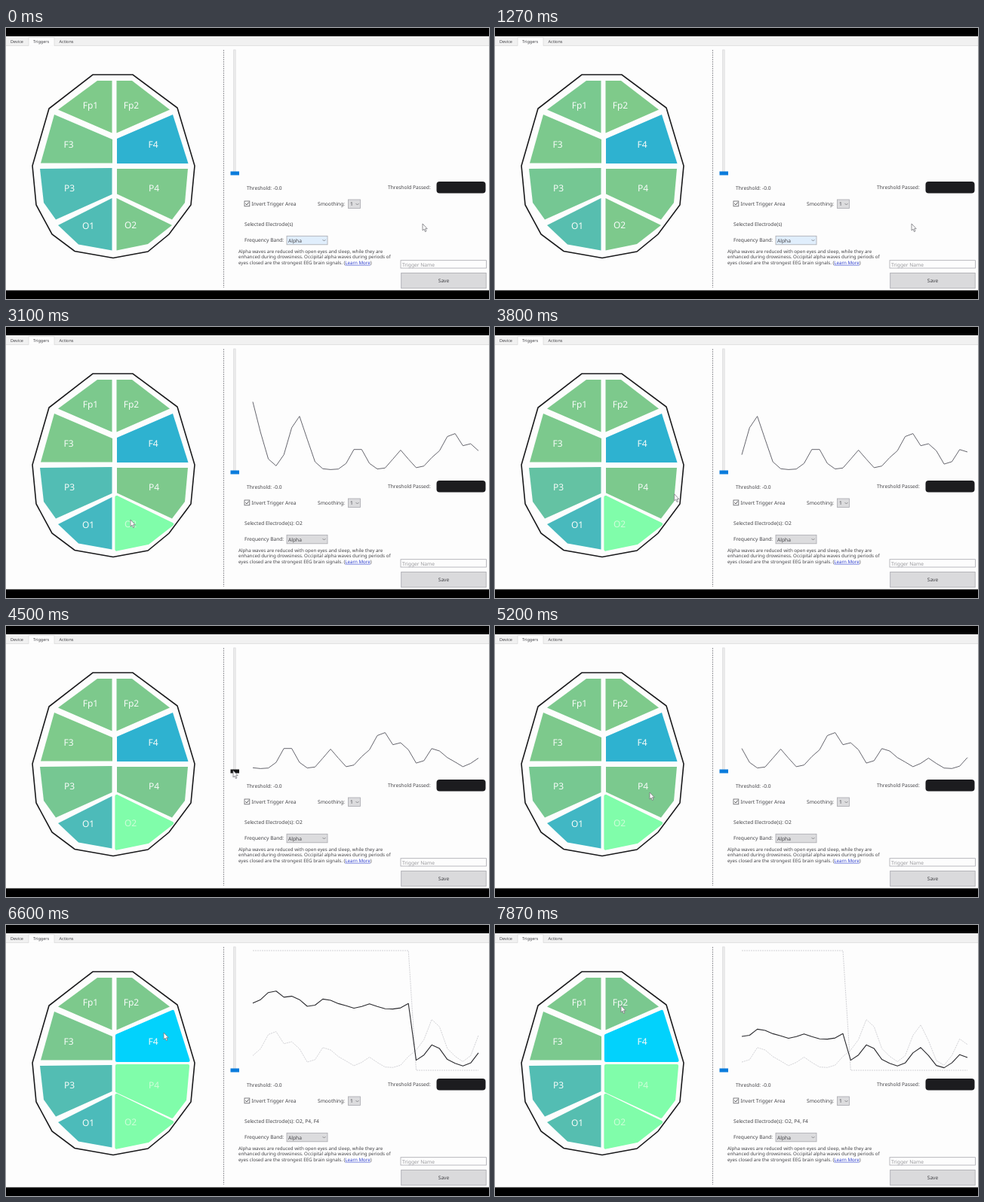
Write an HTML page that moves like this. It is 640 px wide and 360 px high and loops after 8000 ms.

```html
<!DOCTYPE html>
<html lang="en">
<head>
<meta charset="utf-8">
<title>Triggers</title>
<style>
html, body { margin: 0; width: 100%; height: 100%; overflow: hidden; background: #fdfdfd; }
svg { display: block; width: 640px; height: 360px; }
text { font-family: "Noto Sans", "Open Sans", sans-serif; font-size: 6.65px; fill: #444448; text-rendering: geometricPrecision; }
.tab { font-size: 5.5px; }
.note { font-size: 6.2px; }
.name { font-size: 12px; fill: #f6fbf8; text-anchor: middle; }
.box { stroke: #a8a8ae; stroke-width: .8; }
.side { stroke: #d2d2d6; stroke-width: 1; stroke-dasharray: 2 1; }
</style>
</head>
<body>
<svg viewBox="0 0 640 360">
  <rect width="640" height="360" fill="#fdfdfd"/>
  <rect y="11" width="640" height="12.5" fill="#f1f1f1"/>
  <path d="M0 23.5H30V12.5H64V23.5H640" fill="#fdfdfd" stroke="#dcdcdc" stroke-width=".8"/>
  <path d="M0 0H640V11H0ZM0 348.5H640V360H0Z" fill="#000"/>
  <text class="tab" x="6" y="20">Device</text>
  <text class="tab" x="36" y="19.6">Triggers</text>
  <text class="tab" x="70.5" y="20">Actions</text>

  <path d="M288.5 29V345" stroke="#9a9a9e" stroke-dasharray="2 1"/>
  <rect x="301.7" y="29" width="2.4" height="163" fill="#eeeeee" stroke="#d6d6d8" stroke-width=".7"/>
  <rect id="knob" x="297.5" y="190.5" width="11.5" height="5"/>

  <path d="M115 62H168L227 106L250 183L245 235L216 274L188 297L142 305.5L91 296.5L61 274L40 235L35 183L57 107Z" fill="#fdfdfd" stroke="#1a1a1c" stroke-width="1.6"/>
  <g id="head"></g>

  <g fill="none" stroke-linejoin="round">
    <polyline id="lineO2" class="side"/>
    <polyline id="lineP4" class="side"/>
    <polyline id="mean"/>
  </g>

  <text x="319" y="214.5">Threshold:</text>
  <text x="354" y="214.5">-0.0</text>
  <text x="506" y="214">Threshold Passed:</text>
  <rect x="570.5" y="204" width="65" height="15.5" rx="4" fill="#1c1c1f"/>
  <rect class="box" x="316" y="230" width="6.8" height="6.8" fill="#fdfdfd" style="stroke:#606064"/>
  <path d="M317.4 233.3L319 235L321.6 231.6" fill="none" stroke="#444448" stroke-width=".9"/>
  <text x="325.5" y="236.2">Invert Trigger Area</text>
  <text x="413" y="235.8">Smoothing:</text>
  <rect class="box" x="453.5" y="228" width="16" height="11.5" fill="#dcdcde"/>
  <text x="456" y="236.3">1</text>
  <path d="M463.5 233L465.5 235L467.5 233" fill="none" stroke="#6c6c70" stroke-width=".7"/>
  <text id="picked" x="316" y="263.3"></text>
  <text x="316" y="284.3">Frequency Band:</text>
  <rect id="band" class="box" x="372" y="276.3" width="54" height="11.5"/>
  <text x="374" y="284.6">Alpha</text>
  <path d="M419.5 281L421.5 283L423.5 281" fill="none" stroke="#6c6c70" stroke-width=".7"/>
  <text class="note" x="308" y="299">Alpha waves are reduced with open eyes and sleep, while they are</text>
  <text class="note" x="308" y="306.4">enhanced during drowsiness. Occipital alpha waves during periods of</text>
  <text class="note" x="308" y="313.8">eyes closed are the strongest EEG brain signals. (<tspan text-decoration="underline" fill="#3344d0">Learn More</tspan>)</text>
  <rect class="box" x="523" y="308.7" width="113.5" height="10.3" fill="#fdfdfd"/>
  <text x="525" y="316.5" style="fill:#98989c">Trigger Name</text>
  <rect class="box" x="523.7" y="325.5" width="112.5" height="20.3" fill="#dadadc"/>
  <text x="580" y="338.3" text-anchor="middle">Save</text>

  <path id="cursor" d="M0 0V9L2 7.2L3.4 10.6L4.9 10L3.5 6.7H6.2Z" fill="#fdfdfd" stroke="#77777c" stroke-width=".8"/>
</svg>
<script>
const LOOP = 8000, PICK = { O2: 2130, P4: 5270, F4: 6570 }, F4_JOINS = 6730;
const GREEN = [127, 202, 138], TEAL = [60, 182, 200];
const $ = id => document.getElementById(id);
const set = (el, attrs) => { for (const k in attrs) el.setAttribute(k, attrs[k]); };
const make = (tag, attrs) => {
  const el = document.createElementNS('http://www.w3.org/2000/svg', tag);
  set(el, attrs);
  return $('head').appendChild(el);
};
const mix = (a, b, u) => a + (b - a) * u;
const smooth = u => u * u * (3 - 2 * u);
const noise = n => { const s = Math.sin(n * 12.9898) * 43758.5453; return s - Math.floor(s); };

// value at t between keys of [time, ...values]
function track(keys, t, ease = u => u) {
  let i = 0;
  while (i < keys.length - 2 && t >= keys[i + 1][0]) i++;
  const [a, b] = [keys[i], keys[i + 1]];
  const u = ease(Math.min(1, Math.max(0, (t - a[0]) / (b[0] - a[0]))));
  return a.slice(1).map((v, k) => mix(v, b[k + 1], u));
}

// name, label position, outline
const parts = [
  ['Fp1', 112, 107, '121,70 140.5,70 140.5,139.5 69,108.5'],
  ['Fp2', 166, 107, '146.5,70 167,70 217,108.5 146.5,139.5'],
  ['F3', 83, 159, '64,115 141,148 141,179.5 46,179.5'],
  ['F4', 195, 159, '221,115 241.5,180 147,180 147,147'],
  ['P3', 84, 217, '45,187 140.5,186 140.5,221 66,254.5 50,232'],
  ['P4', 196, 217, '147,187 241,187 237,232 220,254.5 147,220.5'],
  ['O1', 109, 267, '140.5,226 140.5,295.5 96,287.5 69,262'],
  ['O2', 165, 266, '146.5,226 220,262 188,287 146.5,295.5']
].map(([name, x, y, points]) => {
  const shape = make('polygon', { points, 'stroke-width': 4.2, 'stroke-linejoin': 'round' });
  const label = make('text', { x, y, class: 'name' });
  label.textContent = name;
  return { name, shape, label };
});

const path = [[1400, 552, 260], [1720, 470, 305], [2110, 165, 256], [3200, 165, 256],
  [4350, 301, 192], [4630, 301, 192], [4940, 205, 221], [5800, 205, 221],
  [6450, 209, 143], [7470, 209, 143], [7870, 167, 107]];

// share of teal in the two lively electrodes
const teal = {
  P3: [[0, .7], [1270, .15], [3100, .7], [4500, .12], [5200, .12], [6600, .66]],
  O1: [[0, .7], [1270, .6], [3100, .9], [4500, .75], [5200, .95], [7870, .6]]
};
function tint(name, i, t) {
  if (name === 'F4') return '#2eb2d0';
  const u = teal[name] ? track(teal[name], t)[0] : .08 * noise(i + Math.floor(t / 800));
  return `rgb(${GREEN.map((v, k) => Math.round(mix(v, TEAL[k], u)))})`;
}

// O2 signal: peaks of [sample, height] over a flat floor; higher ones are wider
const peaks = [[-.4, 95], [5.8, 72], [13.5, 31], [19, 26], [23.3, 15], [25.6, 50], [28.3, 33],
  [32.3, 28], [34.4, 11], [38, 14], [43.6, 18], [46.3, 66], [49, 12], [51.8, 14], [53.1, 52], [58.3, 40]];
const o2 = i => peaks.reduce((y, [c, h]) => y - h * Math.exp(-(((i - c) / (1.1 + h / 150)) ** 2)), 189.5);
const DROP = 44;
const p4 = i => i < DROP ? 34 : 193;

// first visible sample
const pace = [[2100, -7], [3100, 0], [4500, 9], [5200, 14], [6600, 23], [7870, 30]];
const plot = (start, f) => Array.from({ length: 30 }, (_, i) =>
  `${(327 + i * 10.31).toFixed(1)},${f(start + i).toFixed(1)}`).join(' ');

function draw(t) {
  const on = name => t >= PICK[name];
  const tick = Math.floor((t + 67) / 133.34) * 133.34 - 67;
  parts.forEach(({ name, shape, label }, i) => {
    const light = on(name);
    const fill = !light ? tint(name, i, tick) : name === 'F4' ? '#02d2fc' : '#80fdaa';
    set(shape, { fill, stroke: light ? fill : 'none' });
    label.style.fill = light && name !== 'F4' ? '#cdfdd8' : '';
  });

  const start = Math.floor(track(pace, t)[0] + 1e-6), both = on('P4');
  const lift = t >= F4_JOINS ? 40 : 0;
  const mean = i => both ? (o2(i) + p4(i)) / 2 + (i < DROP ? lift : 0) : o2(i);
  set($('mean'), {
    points: on('O2') ? plot(start, mean) : '',
    stroke: both ? '#2a2a2e' : '#55555e',
    'stroke-width': both ? 1.1 : .9
  });
  set($('lineO2'), { points: both ? plot(start, o2) : '' });
  set($('lineP4'), { points: both ? plot(start, p4) : '' });

  const names = Object.keys(PICK).filter(on);
  $('picked').textContent = 'Selected Electrode(s)' + (names.length ? ': ' + names.join(', ') : '');
  set($('band'), { fill: on('O2') ? '#dcdcde' : '#e0eefc' });

  const [x, y] = track(path, t, smooth);
  set($('cursor'), { transform: `translate(${x.toFixed(2)} ${y.toFixed(2)})` });
  const hover = Math.abs(x - 303) < 6 && Math.abs(y - 193) < 4;
  set($('knob'), { fill: hover ? '#171717' : '#0a7cdc' });
}

function frame() {
  draw(performance.now() % LOOP);
  requestAnimationFrame(frame);
}
draw(0);
requestAnimationFrame(frame);
</script>
</body>
</html>
```
